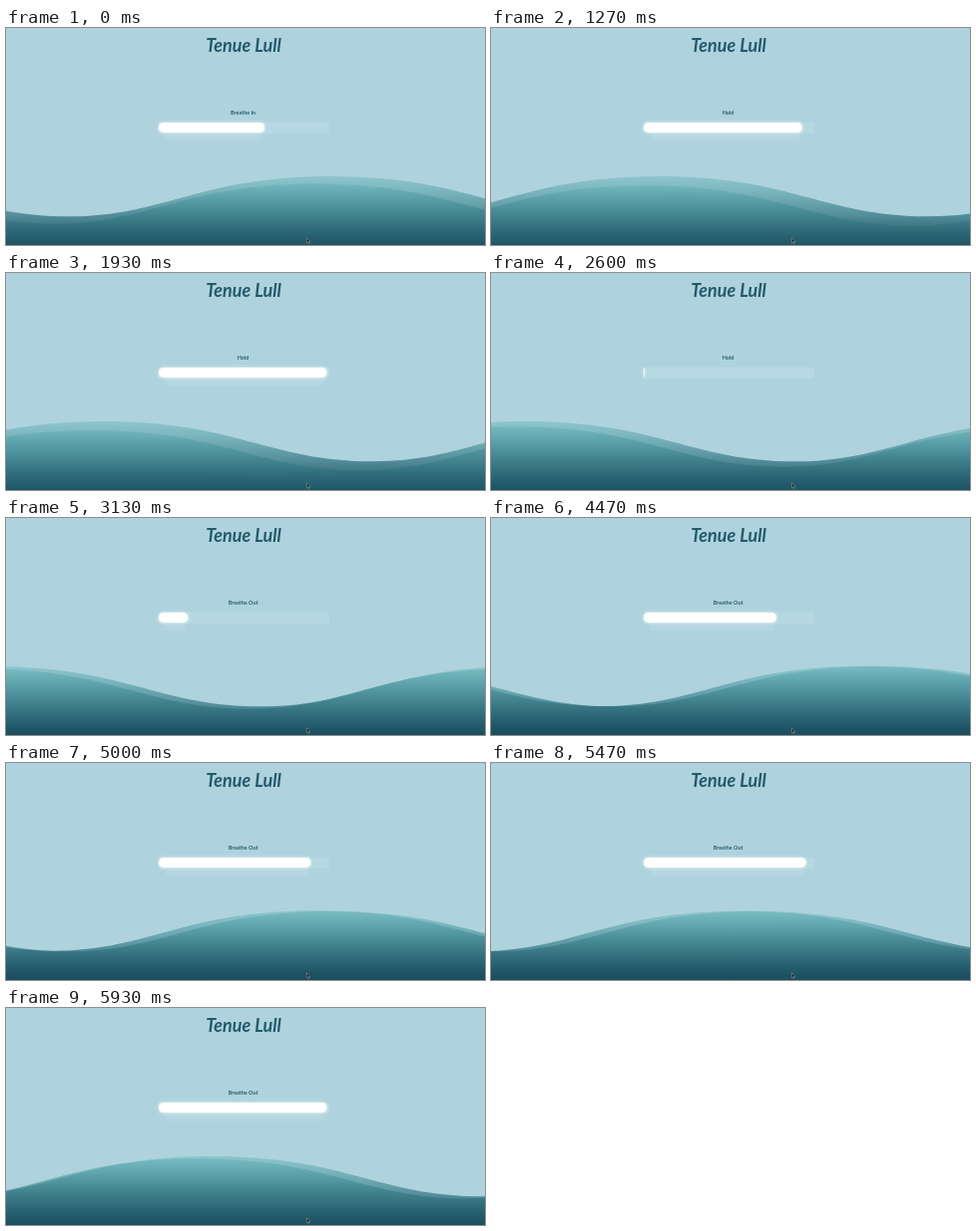
Write an HTML page that moves like this. It is 480 px wide and 218 px high and loops after 5990 ms.

```html
<!DOCTYPE html>
<html lang="en">
<head>
<meta charset="utf-8">
<title>Tenue Lull</title>
<style>
  html, body { margin: 0; width: 100%; height: 100%; overflow: hidden; background: #aed3de; }
  svg { display: block; width: 100vw; height: 100vh; }
  text { font-family: Lato, "Open Sans", sans-serif; font-weight: 700; text-anchor: middle; }
  .title { font-size: 18px; font-style: italic; fill: #24596a; }
  .label { font-size: 5.45px; fill: #2a5d6e; }
</style>
</head>
<body>
<svg viewBox="0 0 480 218" preserveAspectRatio="none">
  <defs>
    <linearGradient id="water" gradientUnits="userSpaceOnUse" x1="0" y1="-21.7" x2="0" y2="198">
      <stop offset="0" stop-color="#57b3b5" stop-opacity=".27"/>
      <stop offset="1" stop-color="#1c4f60"/>
    </linearGradient>
    <filter id="soft" filterUnits="userSpaceOnUse" x="140" y="80" width="200" height="50">
      <feGaussianBlur stdDeviation="1.4"/>
    </filter>
    <path id="swellPath" fill="url(#water)"/>
  </defs>

  <rect width="480" height="218" fill="#aed3de"/>
  <rect y="215" width="480" height="3" fill="#1c4f60"/>
  <use id="back" href="#swellPath"/>
  <use id="front" href="#swellPath"/>

  <text class="title" x="238" y="24">Tenue Lull</text>
  <text class="label" id="label" x="237.6" y="87"></text>

  <rect x="152.5" y="94.5" width="171.5" height="11.5" rx="2" fill="#fff" fill-opacity=".1"/>
  <g fill="#fff">
    <rect id="haze" x="160" y="106" height="7" opacity=".1" filter="url(#soft)"/>
    <rect id="glow" x="152.5" y="94.5" height="11.5" rx="5" opacity=".5" filter="url(#soft)"/>
    <rect id="fill" x="153" y="95" height="10" rx="5"/>
  </g>

  <path d="M301.4 210.8v5l1.1-.9.8 1.7.8-.4-.8-1.6h1.5z" fill="#111" stroke="#c5d5da" stroke-width=".4"/>
</svg>
<script>
const LOOP = 5990;
const FRAME = 1000 / 15;
const PAUSE = [2, 15];          // frames between which the picture stands still
const PAGE_START = -14510;      // when the water began to move
const WAVE_TIME = 5000, SWELL_TIME = 7000;
const BAR_START = 2560, BAR_TIME = 4000, BAR_WIDTH = 171;

const $ = id => document.getElementById(id);
const [back, front, label, fill, glow, haze] =
  ["back", "front", "label", "fill", "glow", "haze"].map($);

const crest = "c289 0 389-121 789-121c401.1 0 500 121 811 121";
$("swellPath").setAttribute("d", `M0 121${crest}${crest}v77H0z`);

function bezier(x1, y1, x2, y2) {
  const at = (a, b, s) => 3 * a * s * (1 - s) ** 2 + 3 * b * s * s * (1 - s) + s ** 3;
  return x => {
    let lo = 0, hi = 1;
    for (let i = 0; i < 30; i++) {
      const mid = (lo + hi) / 2;
      if (at(x1, x2, mid) < x) lo = mid; else hi = mid;
    }
    return at(y1, y2, (lo + hi) / 2);
  };
}
const ease = bezier(.25, .1, .25, 1);
const drift = bezier(.36, .45, .63, .53);

const phase = (t, period) => ((t % period) + period) % period / period;

function placeWave(node, age, y) {
  const x = -1600 * drift(phase(age, WAVE_TIME));
  node.setAttribute("transform", `translate(0 149) scale(${1 / 3}) translate(${x} ${y})`);
}

// Vertical offset of the front wave: up, down, and up again.
function swell(age) {
  const p = phase(age + 1250, SWELL_TIME) * 2;
  return p < 1 ? -2 + 30 * ease(p) : 28 - 30 * ease(p - 1);
}

function draw(ms) {
  let frame = Math.floor((ms + 3.5) / FRAME);
  if (frame > PAUSE[0] && frame < PAUSE[1]) frame = PAUSE[0];
  const t = frame * FRAME;
  const age = t - PAGE_START;

  placeWave(back, age, 0);
  placeWave(front, age + 125, swell(age));

  const width = BAR_WIDTH * ease(phase(t - BAR_START, BAR_TIME));
  fill.setAttribute("width", width);
  glow.setAttribute("width", width + 1);
  haze.setAttribute("width", Math.max(0, width - 10));

  const text = t < 1240 ? "Breathe In" : t < 2840 ? "Hold" : "Breathe Out";
  if (label.textContent !== text) label.textContent = text;
}

const start = performance.now();
function tick() {
  draw((performance.now() - start) % LOOP);
  requestAnimationFrame(tick);
}
tick();
</script>
</body>
</html>
```
